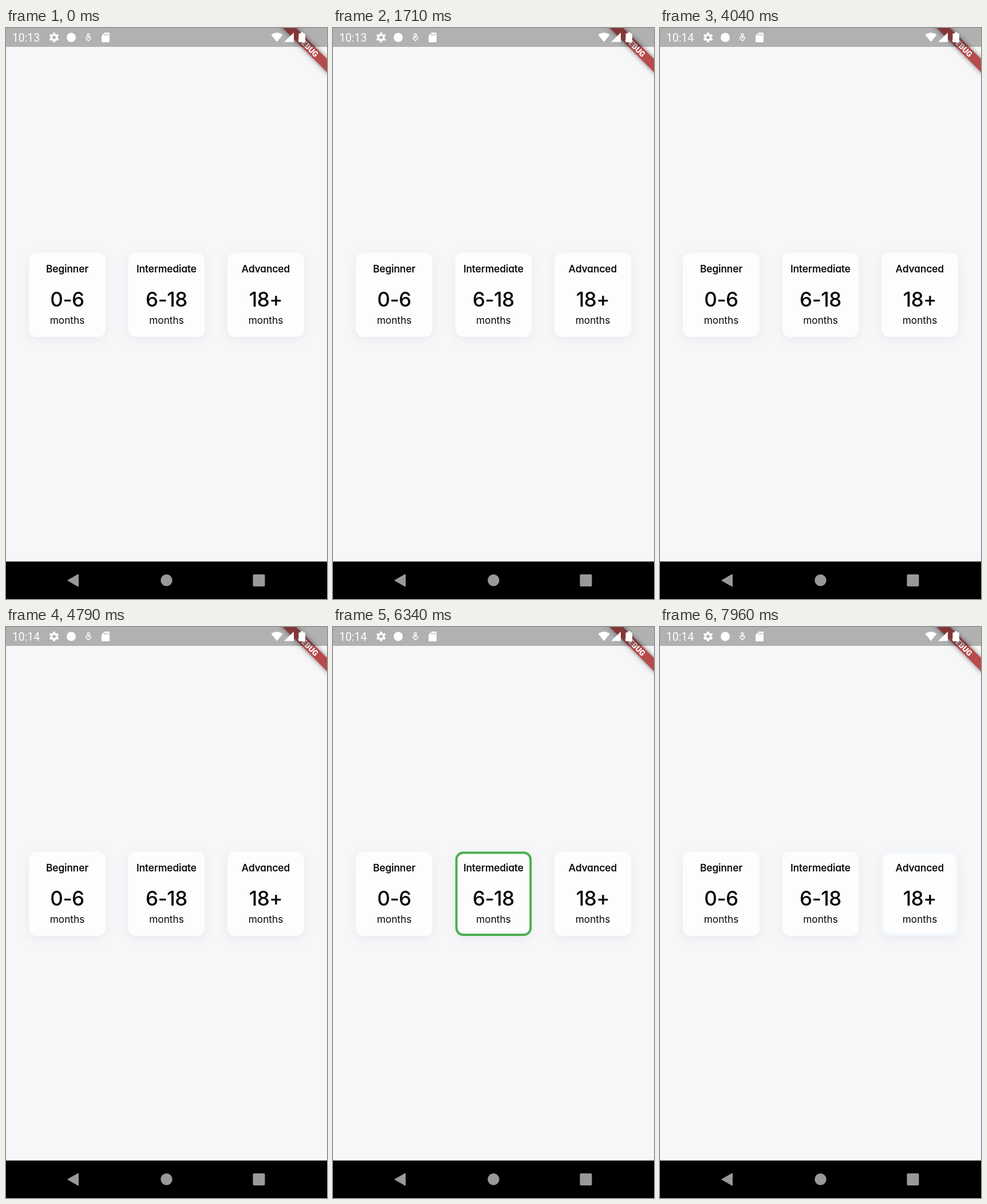
Recreate the animation shown at these times as an HTML page. Size 561 by 998 pixels, loop 8 s.

```html
<!DOCTYPE html>
<html lang="en">
<head>
<meta charset="utf-8">
<title>Level picker</title>
<style>
  html, body { margin: 0; width: 100%; height: 100%; overflow: hidden; background: #f7f7f9; }
  svg { display: block; width: 100vw; height: 100vh; }
  .card text { font-family: Inter, "Open Sans", sans-serif; font-feature-settings: "cv11"; text-anchor: middle; fill: #080808; }
  .card .title { font-size: 17.3px; font-weight: 500; stroke: #080808; stroke-width: .25px; }
  .card .range { font-size: 35px; font-weight: 500; letter-spacing: -.5px; }
  .card .unit { font-size: 17.3px; }
  .panel { fill: #fdfdfd; filter: drop-shadow(0 4px 9px rgba(60, 60, 100, .07)); }
  .ring { fill: none; stroke-width: 4; opacity: 0; }
  .ribbon { fill: #b74b4b; filter: drop-shadow(0 0 4px rgba(0, 0, 0, .5)); }
  .ribbon-label { font: 900 13.6px Roboto, sans-serif; fill: #fff; text-anchor: middle; }
  #clock { font: 19.3px Roboto, sans-serif; }
</style>
</head>
<body>
<svg viewBox="0 0 561 998">
  <rect width="561" height="998" fill="#f7f7f9"/>
  <g id="cards"></g>

  <g transform="translate(561 0) rotate(45)">
    <rect class="ribbon" x="-60" y="38.2" width="120" height="16.4"/>
    <text class="ribbon-label" y="51.3">DEBUG</text>
  </g>

  <rect width="561" height="33" fill="#000" opacity=".285"/>
  <g fill="#fff">
    <text id="clock" x="11" y="24">10:13</text>
    <g transform="translate(84 16.5)">
      <circle r="4.6" fill="none" stroke="#fff" stroke-width="3.4"/>
      <g id="teeth"></g>
    </g>
    <circle cx="114" cy="16.5" r="8"/>
    <g fill="none" stroke="#fff" stroke-width="1.4">
      <circle cx="144" cy="12" r="2"/>
      <path d="M144 22.5l-4-4a1.9 1.9 0 0 1 4-1.6a1.9 1.9 0 0 1 4 1.6z"/>
    </g>
    <path d="M172.500 8H179.500Q181 8 181 9.500V23.500Q181 25 179.500 25H168.500Q167 25 167 23.500V13.500Z"/>
    <path d="M172.500 10v3.500m3-3.500v3.500m3-3.500v3.500" stroke="#b2b2b2" stroke-width="1.300"/>
    <path d="M463.500 12Q473.500 4.500 483.500 12L473.500 24.500Z"/>
    <path d="M503 8V24.500H486Z"/>
    <path d="M515 7.500h4.500v2h3.500V25h-11.500V9.500h3.500Z"/>
  </g>

  <rect y="932.500" width="561" height="65.500"/>
  <g fill="#999">
    <path d="M108.500 965.500L126 955.500V975.500Z" stroke="#999" stroke-width="2" stroke-linejoin="round"/>
    <circle cx="280.500" cy="965.300" r="10.200"/>
    <rect x="431.500" y="955" width="21" height="21" rx="2"/>
  </g>
</svg>
<script>
  const LOOP = 8000;
  const MINUTE_TICK = 2900;
  const levels = [
    { title: "Beginner", range: "0-6", x: 107 },
    { title: "Intermediate", range: "6-18", x: 280.5, color: "#4caf50", fadeIn: [5300, 5650], fadeOut: [7300, 7600] },
    { title: "Advanced", range: "18+", x: 454, color: "#2196f3", fadeIn: [7940, 8340] }
  ];

  const cards = document.getElementById("cards");
  cards.innerHTML = levels.map(({ title, range, x, color = "none" }) => `
    <g class="card" transform="translate(${x} 0)">
      <rect class="panel" x="-67" y="392.500" width="134" height="147.500" rx="14"/>
      <rect class="ring" x="-64.800" y="394.500" width="129.600" height="143.500" rx="12" stroke="${color}"/>
      <text class="title" y="427">${title}</text>
      <text class="range" y="486.500">${range}</text>
      <text class="unit" y="517">months</text>
    </g>`).join("");

  document.getElementById("teeth").innerHTML = Array.from({ length: 6 }, (_, i) =>
    `<rect x="-2" y="-8.500" width="4" height="4" rx=".6" transform="rotate(${i * 60})"/>`).join("");

  const rings = cards.querySelectorAll(".ring");
  const clock = document.getElementById("clock");
  const progress = (t, [from, to]) => Math.min(1, Math.max(0, (t - from) / (to - from)));

  function draw(now) {
    const t = now % LOOP;
    clock.textContent = t < MINUTE_TICK ? "10:13" : "10:14";
    levels.forEach(({ fadeIn, fadeOut }, i) => {
      const shown = fadeIn ? progress(t, fadeIn) : 0;
      const hidden = fadeOut ? progress(t, fadeOut) : 0;
      rings[i].style.opacity = shown - hidden;
    });
  }

  const start = performance.now();
  function tick() {
    draw(performance.now() - start);
    requestAnimationFrame(tick);
  }
  tick();
</script>
</body>
</html>
```
